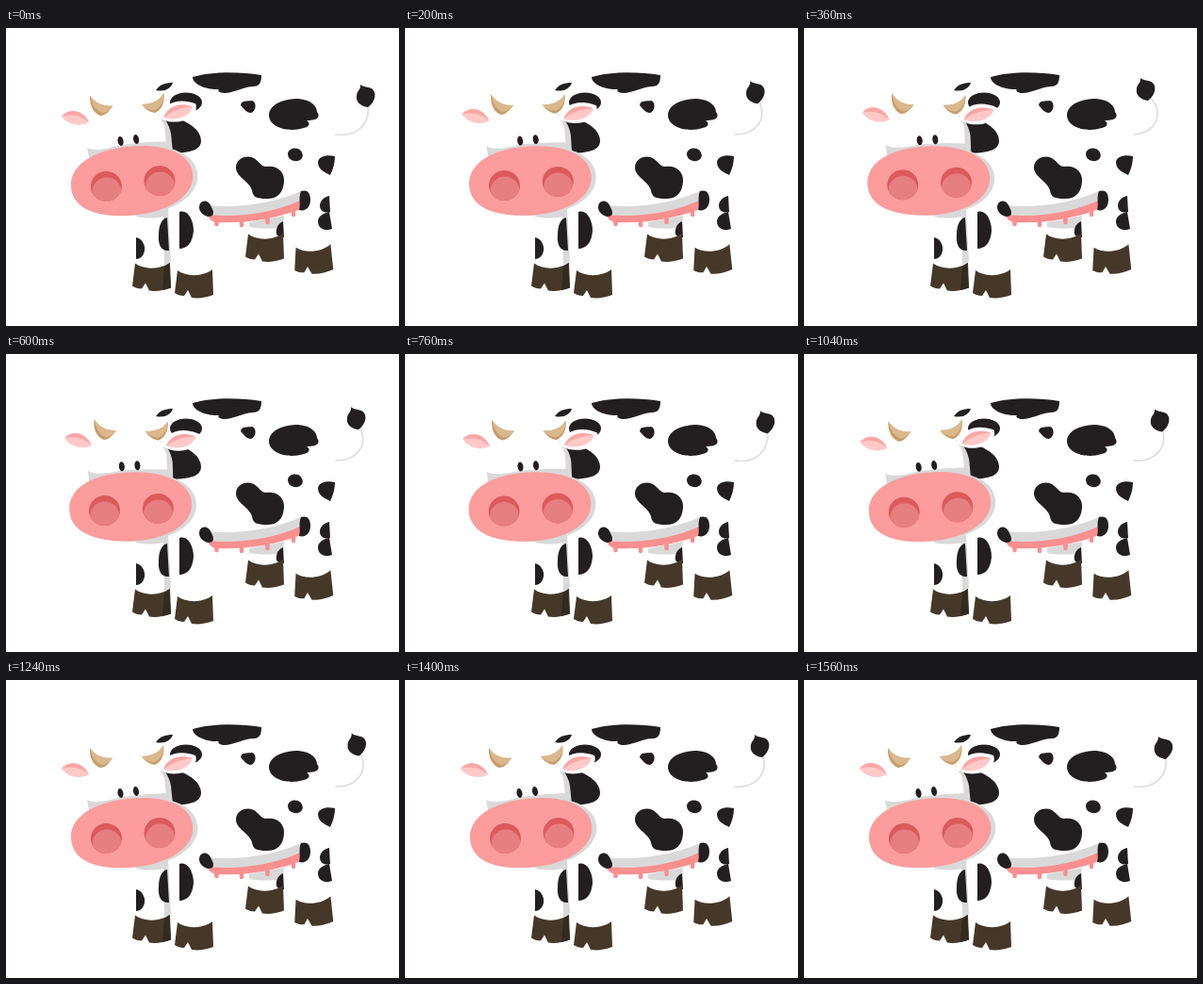
Recreate the animation shown at these times as an HTML page. Size 417 px wide and 316 px high, loop 1600 ms.

```html
<!DOCTYPE html>
<html lang="en">
<head>
<meta charset="utf-8">
<title>Cow</title>
<style>
html, body { margin: 0; width: 100%; height: 100%; overflow: hidden; background: #fff; }
svg { display: block; width: 100vw; height: 100vh; }
.ink { fill: #231f20; }
.shade { fill: #d9d9d9; }
.hoof { fill: #463829; }
.white { fill: #fff; }
.pink { fill: #fc9c9c; }
.horn { fill: #dab88d; }
.horn-dark { fill: #c79d6c; }
.ear { fill: #ffc9c8; }
.ear-dark { fill: #fba6a6; }
</style>
</head>
<body>
<svg viewBox="0 0 417 316">
  <defs>
    <path id="hoof" d="M3 1C12 8 30 8 40 0L41 27C33 30 25 31 18 30L14 22L10 28C6 28 3 27 0 25Z"/>
    <path id="muzzle" d="M-65 1C-65-23-38-36.500 0-36.500S65-23 65-1S38 36.500 0 36.500S-65 25-65 1Z" transform="translate(133.700 162) rotate(-6)"/>
    <clipPath id="hole"><ellipse rx="16.500" ry="16"/></clipPath>
    <g id="nostril" clip-path="url(#hole)">
      <circle r="17" fill="#dc5a5c"/>
      <ellipse cy="6" rx="15.500" ry="15.500" fill="#e67f80"/>
    </g>
  </defs>

  <g class="ink">
    <path d="M159 66C163 60 169 58 177 58C175 64 169 68 159 66Z"/>
    <path d="M198 52C217 46 248 46 271 50C271 58 269 62 262 62C250 63 241 69 232 69C226 69 224 66 226 65C214 66 198 60 198 52Z"/>
    <path d="M249 82C250 76 256 78 261 77C266 78 266 88 260 90C255 90 252 85 249 82Z"/>
    <path d="M279 92C280 80 296 75 310 75C324 76 330 83 330 89C333 93 333 98 319 98C322 100 324 104 316 106C300 111 279 106 279 92Z"/>
    <path d="M299 133C301 126 311 126 314 132C317 138 311 142 306 141C301 140 299 137 299 133Z"/>
    <path d="M331 142C332 136 340 134 349 136C349 143 347 150 344 156C338 153 331 150 331 142Z"/>
    <path d="M244 148C244 139 254 134 263 138C269 142 271 147 276 147C288 145 296 153 295 163C294 175 288 181 277 181C265 181 262 179 261 172C258 162 244 158 244 148Z"/>
    <path d="M343 178L344 195C338 197 333 194 333 188C333 183 338 179 343 178Z"/>
    <path d="M343 195L346 213C339 216 331 213 331 205C331 199 338 196 343 195Z"/>
    <ellipse cx="191" cy="79" rx="17" ry="10.500"/>
    <path d="M168 97L187 98C196 102 206 108 207 119C207 129 198 132 176 133L170 133Z"/>
  </g>

  <path class="shade" d="M258 206L295 199L294 211C283 213 270 213 258 211Z"/>
  <path class="ink" d="M294 205L295 222C288 222 286 219 287 214C288 209 290 207 294 205Z"/>
  <path class="shade" d="M213 188C250 192 290 184 315 172L315 184C290 196 250 204 214 200Z"/>
  <path d="M214 198C250 202 290 194 314 182L313 192C290 201 255 208 222 206C217 204 215 202 214 198Z" fill="#fa8f90"/>
  <path d="M223.500 204v4M250 205v4M277.500 202v4M305 194v4" stroke="#fa8f90" stroke-width="4.500" stroke-linecap="round"/>
  <path class="ink" d="M206 186C210 181 216 184 218 190C222 197 220 200 214 200C207 198 203 192 206 186Z"/>
  <path class="ink" d="M313 173C319 171 323 174 323 182C323 190 318 195 311 193C313 186 310 180 313 173Z"/>

  <g class="hoof">
    <use href="#hoof" x="254" y="217.500"/>
    <use href="#hoof" transform="translate(304.500 232) rotate(-4)"/>
    <use href="#hoof" x="134" y="248.500"/>
  </g>
  <path d="M168 253L173 249.500L175 275.500L166 278Z" fill="#332a20"/>
  <path class="shade" d="M138 196L174 190L176 247L168 252L167 200C158 202 148 202 138 200Z"/>
  <path class="ink" d="M138 222C144 223 148 230 147 236C146 242 142 245 138 245Z"/>
  <path class="ink" d="M171 201L173 236C165 237 161 230 162 219C162 210 165 202 171 201Z"/>
  <path class="white" d="M172 190L187 190L180 258L175 249Z"/>
  <path class="ink" d="M184 195C193 192 199 204 199 215C198 228 192 234 184 234Z"/>
  <use class="hoof" href="#hoof" x="179" y="256"/>

  <path id="tail" fill="none" stroke="#dedede" stroke-width="1.700" stroke-linecap="round"/>
  <path id="tuft" class="ink" d="M-5-12C0-8 7-11 10-4C12 3 7 9 3 12C-4 11-10 7-9 0C-9-5-4-7-5-12Z"/>

  <g id="head">
    <path class="shade" d="M160 90C168 94 173 102 175 112L177 132L164 132L164 96Z"/>
    <use class="shade" href="#muzzle" x="5"/>
    <path class="white" d="M87 136C84 108 92 88 125 86C149 84 164 91 168 104L171 132Z"/>
    <path class="shade" d="M86 127C92 131 106 129 122 124L150 121L172 120L174 132L88 138Z"/>

    <path class="white" d="M161 95C166 80 182 73 201 80C205 90 192 102 172 99Z"/>
    <path class="ear" d="M167 95C171 84 182 78 198 83C195 94 180 99 167 95Z"/>
    <path class="ear-dark" d="M167 95C171 84 182 78 198 83C185 84 176 88 167 95Z"/>
    <path class="ear" d="M59 94C66 85 81 86 88 100C80 105 66 104 59 94Z"/>
    <path class="ear-dark" d="M59 94C66 85 81 86 88 100C80 93 70 91 59 94Z"/>

    <path class="horn-dark" d="M89 72C93 78 101 84 113 82.500C109 89 105 93 100 93C93 91 88 82 89 72Z"/>
    <path class="horn" d="M89 72C93 78 101 84 113 82.500C109 88 106 90 102 90C95 88 91 81 89 72Z"/>
    <path class="horn-dark" d="M144 81C154 81 163 77 167 69C169 78 165 87 158 90C152 89 147 86 144 81Z"/>
    <path class="horn" d="M144 81C154 81 163 77 167 69C168 77 164 84 158 87C152 87 147 85 144 81Z"/>

    <ellipse class="ink" cx="121.500" cy="120" rx="3" ry="5" transform="rotate(-10 121.500 120)"/>
    <ellipse class="ink" cx="138" cy="118" rx="3" ry="5" transform="rotate(-10 138 118)"/>

    <use class="pink" href="#muzzle"/>
    <use href="#nostril" transform="translate(106.500 168) rotate(-6)"/>
    <use href="#nostril" transform="translate(163 162) rotate(-6)"/>
  </g>
</svg>
<script>
const LOOP = 1600;
const head = document.getElementById("head");
const tail = document.getElementById("tail");
const tuft = document.getElementById("tuft");

// [time, value] pairs; values ease in and out between neighbours
const nod = [[-80, 0], [500, 4.1], [1200, 0], [1520, 0], [2100, 4.1]];
const swing = [[0, 1], [400, -0.03], [840, 1.13], [1220, 0.5], [1600, 1]];

function ease(keys, t) {
  const i = keys.findIndex(k => k[0] > t);
  const [t0, a] = keys[i - 1];
  const [t1, b] = keys[i];
  return a + (b - a) * (1 - Math.cos(Math.PI * (t - t0) / (t1 - t0))) / 2;
}

function draw(t) {
  const k = ease(swing, t);
  const mix = (a, b) => (a + (b - a) * k).toFixed(2);
  head.setAttribute("transform", `rotate(${ease(nod, t).toFixed(3)} 134 139)`);
  tail.setAttribute("d", `M350 113C372 ${mix(111, 116)} ${mix(384, 387)} ${mix(92, 102)} ${mix(367, 384)} ${mix(73, 81)}`);
  tuft.setAttribute("transform", `translate(${mix(362, 381)} ${mix(65, 72)})`);
}

const start = performance.now();
function tick() {
  draw((performance.now() - start) % LOOP);
  requestAnimationFrame(tick);
}
tick();
</script>
</body>
</html>
```
